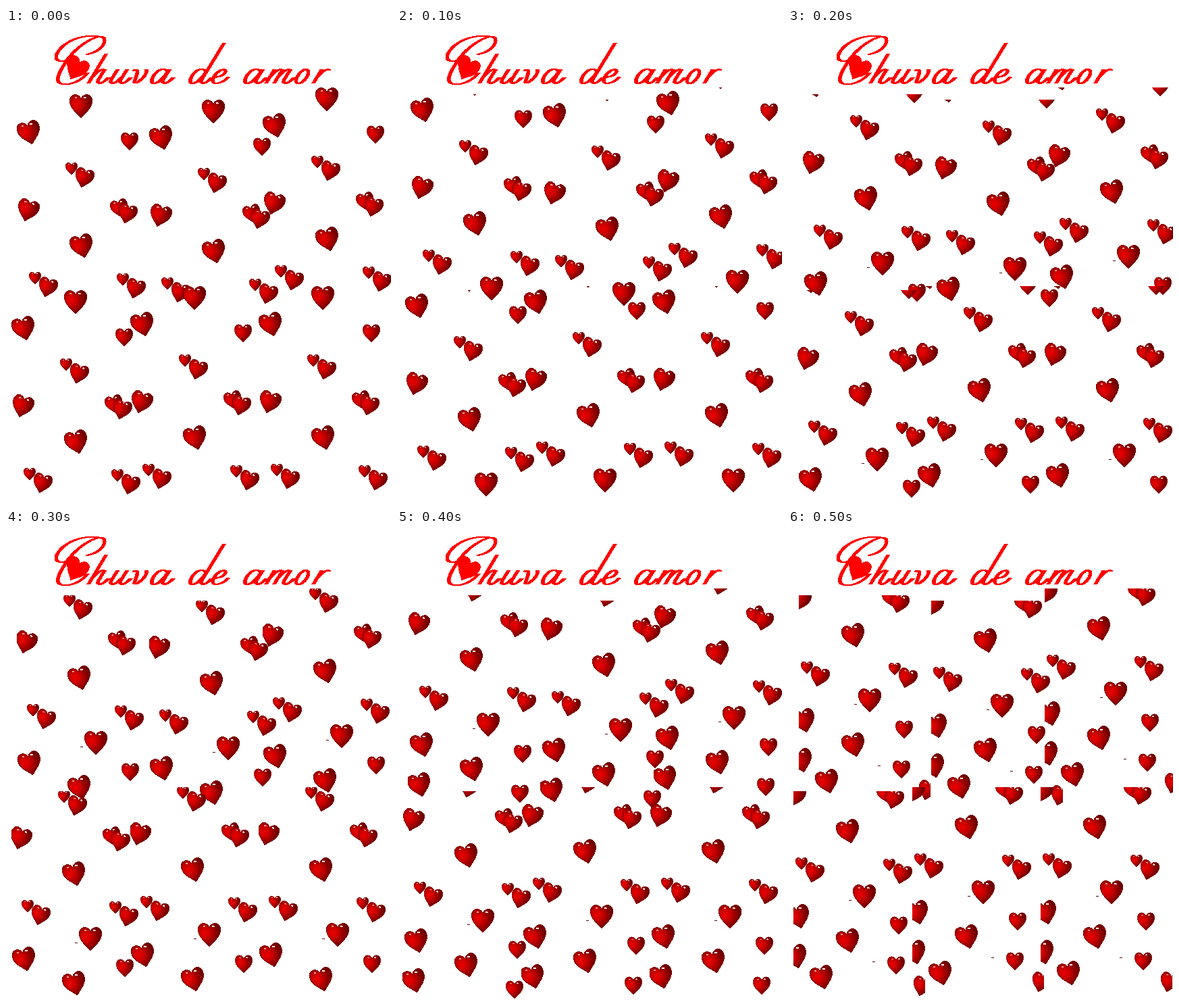
An HTML page for the animation above (0.6 s loop, 570 by 700 pixels).

```html
<!DOCTYPE html>
<html lang="pt">
<head>
<meta charset="utf-8">
<title>Chuva de amor</title>
<style>
  html, body { margin: 0; width: 100%; height: 100%; overflow: hidden; background: #fff; }
  svg { display: block; }
  svg svg { overflow: hidden; }
</style>
</head>
<body>
<svg width="570" height="700" viewBox="0 0 570 700" shape-rendering="crispEdges">
  <defs>
    <radialGradient id="shade" cx=".3" cy=".42" r=".72">
      <stop offset="0" stop-color="#ee0000"/>
      <stop offset=".3" stop-color="#cc0000"/>
      <stop offset=".65" stop-color="#900000"/>
      <stop offset="1" stop-color="#600000"/>
    </radialGradient>
    <path id="shape" d="M0 -10C-3 -18 -16 -19 -16 -6C-16 4 -6 10 0 17C6 10 16 4 16 -6C16 -19 3 -18 0 -10Z"/>
    <g id="heart">
      <use href="#shape" fill="url(#shade)" stroke="#780000"/>
      <ellipse cx="-7" cy="-11.5" rx="1.8" ry="1" fill="#ff9a9a"/>
      <ellipse cx="5.5" cy="-11.5" rx="2" ry="1.3" fill="#fff"/>
    </g>
    <g id="strip"></g>
    <g id="letters" fill="none" stroke="#f00" stroke-width="1.6" stroke-linejoin="round"></g>
  </defs>
  <g id="title" role="img" aria-label="Chuva de amor">
    <use href="#shape" fill="#f00" transform="translate(104 60) rotate(28) scale(1.06)"/>
  </g>
  <g id="tiles"></g>
</svg>
<script>
const $ = id => document.getElementById(id);

function add(parent, tag, attrs) {
  const el = document.createElementNS('http://www.w3.org/2000/svg', tag);
  for (const k in attrs) el.setAttribute(k, attrs[k]);
  parent.appendChild(el);
  return el;
}

// Script letters built from a few slanted pen strokes
const lean = .6, xh = 21;
const stem = (x, h = xh) => `M${x + h * lean} ${-h}L${x} 0`;
const hook = (x, h = xh) =>
  `M${x + h * lean} ${-h}L${x + 3} -6Q${x} 0 ${x + 5} 0Q${x + 12} -2 ${x + 18} -9`;
const arch = x => `M${x + 4} -7Q${x + 18} -24 ${x + 24} -20`;
const bowl = 'M24 -18Q20 -23 13 -20C4 -16 -3 -2 3 0C10 1 20 -10 26 -20';
const glyphs = {
  h: stem(0, 44) + arch(0) + hook(12),
  u: hook(0) + hook(14),
  v: 'M5 -19Q12 -23 10 -14L6 -2Q8 1 14 -4Q26 -14 24 -21',
  a: bowl + hook(15),
  d: bowl + hook(15, 60),
  e: 'M3 -9Q18 -10 20 -18Q19 -23 12 -19C2 -13 -3 -1 5 0Q15 0 24 -9',
  m: stem(0) + arch(0) + stem(12) + arch(12) + hook(24),
  o: 'M14 -21C4 -17 -4 -2 3 0C11 1 23 -15 17 -20Q15 -22 13 -20',
  r: stem(0) + arch(0),
  C: 'M48 -43C65 -46 77 -58 73 -67C67 -75 38 -60 20 -37C6 -16 -2 -1 12 1C26 3 42 -6 49 -16' +
     'M17 -34C1 -29 -4 -40 13 -56C31 -70 54 -73 72 -68'
};

function write(word, x, step) {
  [...word].forEach((ch, i) =>
    add($('letters'), 'path', { d: glyphs[ch], transform: `translate(${x + i * step} 82)` }));
}
write('C', 70, 0);
write('huva', 120, 31);
write('de', 270, 33);
write('am', 351, 32);
write('or', 427, 26);
// Flat nib: the same outline repeated sideways
for (let dx = 0; dx < 5; dx++) add($('title'), 'use', { href: '#letters', x: dx });

// Parts show once they have risen above their limit in the tile
const parts = [];
function place(el, y, limit) { parts.push({ el, y, limit }); }

function heart(x, y, size, tilt = 0) {
  const transform = `translate(${x} ${y}) scale(${size}) rotate(${tilt} 0 -6)`;
  place(add($('strip'), 'use', { href: '#heart', transform }), y, 300);
}
function speck(x, y) {
  place(add($('strip'), 'rect', { x, y, width: 4, height: 1, fill: '#500000' }), y, 260);
}
const large = (x, y) => heart(x, y, 1.03);
const left = (x, y) => heart(x, y, 1.03, -14);
const right = (x, y, size = .86) => heart(x, y, size, 16);
const row = (x, y) => { left(x, y); heart(x + 150, y + 12.5, .79); };
const duo = (x, y) => { heart(x, y, .55); right(x + 20, y + 14); };
const overlap = (x, y) => { heart(x, y, .8, -14); right(x + 14, y + 8); };

large(95, 17);
row(17, 57);
duo(81, 110);
overlap(151, 169);
right(18, 172, .97);
left(95, 225);
duo(27, 272);
duo(157, 274);
large(120, 320);
speck(97, 326);
row(21, 351);
left(95, 387);
row(17, 410);
speck(132, 417);
left(56, 441);
right(207, 454);

for (const [x, y] of [[16, 98], [212, 106], [380, 88], [8, 388], [184, 382], [374, 382]])
  add(add($('tiles'), 'svg', { x, y, width: 195, height: 307 }), 'use', { href: '#strip' });

const drift = [[0, 0], [4, -33], [4, -70], [-3, -102], [-1, -129], [-15, -165]];

function draw(now) {
  const [dx, dy] = drift[Math.floor(now % 600 / 100)];
  $('strip').setAttribute('transform', `translate(${dx} ${dy})`);
  for (const { el, y, limit } of parts)
    el.setAttribute('display', y + dy < limit ? 'inline' : 'none');
}

const start = performance.now();
function tick() {
  draw(performance.now() - start);
  requestAnimationFrame(tick);
}
tick();
</script>
</body>
</html>
```
